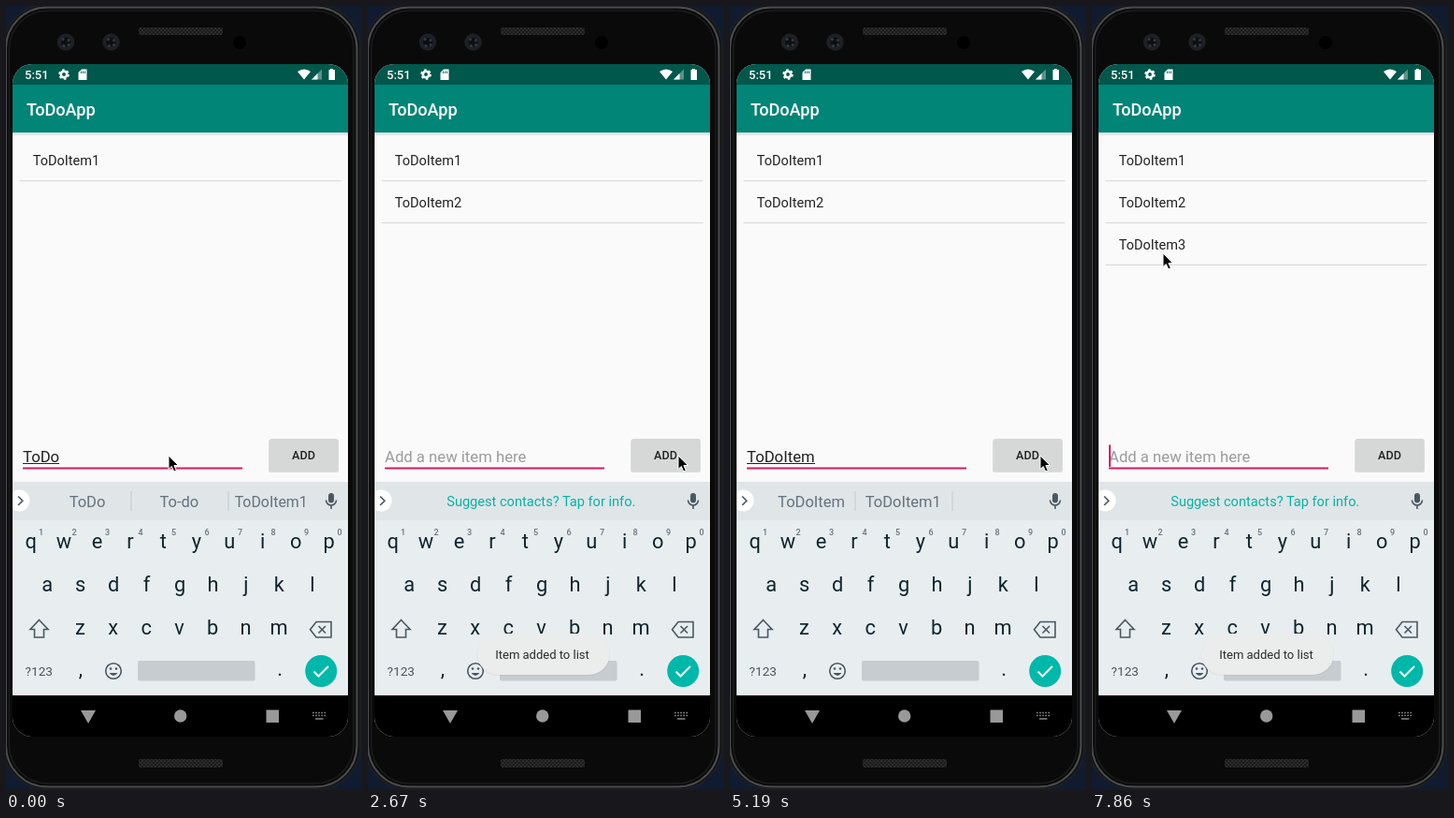
Animation, 381 px wide and 837 px high, one loop 8 s. Source, as an HTML page:

```html
<!DOCTYPE html>
<html lang="en">
<head>
<meta charset="utf-8">
<title>ToDoApp</title>
<style>
  html, body { margin: 0; width: 100%; height: 100%; overflow: hidden; background: #111b30; }
  svg { display: block; width: 381px; height: 837px; font-family: Roboto, sans-serif; }
  text { white-space: pre; }
  .mid { text-anchor: middle; }
  .medium { font-weight: 500; }
  .key { font-size: 21.8px; fill: #10252d; }
  .digit { font-size: 9px; font-weight: 500; fill: #68737a; }
  .item { font-size: 14.5px; fill: #212121; }
  .entry { font-size: 16.7px; }
  .suggestion { font-size: 16.5px; fill: #65737b; }
  .line { fill: none; stroke: #4a5860; stroke-width: 1.6; }
</style>
</head>
<body>
<svg viewBox="0 0 381 837">
  <defs>
    <pattern id="mesh" width="4" height="4" patternUnits="userSpaceOnUse">
      <rect width="4" height="4" fill="#1b1b1b"/>
      <path d="M0 4L4 0M0 0L4 4" stroke="#303030" stroke-width=".8"/>
    </pattern>
    <linearGradient id="shade" x2="0" y2="1">
      <stop stop-color="#000" stop-opacity=".16"/>
      <stop offset="1" stop-color="#000" stop-opacity="0"/>
    </linearGradient>
    <clipPath id="screen"><rect x="7" y="62" width="359" height="718" rx="21"/></clipPath>
  </defs>

  <!-- phone body -->
  <rect x="-3" y="-1" width="382" height="837" rx="46" fill="#111214" stroke="#1d1e20" stroke-width="2"/>
  <rect x="0" y="1.500" width="375.500" height="832" rx="44" fill="#0a0a0a" stroke="#4b4d50" stroke-width="2"/>
  <rect x="3.500" y="5" width="368.500" height="825" rx="41" fill="#0a0a0a" stroke="#1c1c1d" stroke-width="1.500"/>
  <rect x="142" y="23" width="90" height="8" rx="2" fill="url(#mesh)"/>
  <rect x="142" y="804" width="90" height="9" rx="2" fill="url(#mesh)"/>
  <g id="lenses"></g>
  <circle cx="250" cy="39" r="7" fill="#000"/>

  <g clip-path="url(#screen)">
    <rect x="7" y="62" width="359" height="718" fill="#fafafa"/>
    <rect x="7" y="135" width="359" height="4" fill="url(#shade)"/>
    <rect x="7" y="62" width="359" height="22" fill="#00574b"/>
    <rect x="7" y="84" width="359" height="51" fill="#008577"/>

    <!-- status bar -->
    <g fill="#fff">
      <text class="medium" x="20" y="78" font-size="13">5:51</text>
      <circle cx="62" cy="73" r="3.2" fill="none" stroke="#fff" stroke-width="2.6"/>
      <circle cx="62" cy="73" r="5" fill="none" stroke="#fff" stroke-width="1.6" stroke-dasharray="2.6 2.636"/>
      <path d="M81 67.500H86.500V79H77.500V71Z"/>
      <path d="M80.500 69.500V72M82.500 69.500V72M84.500 69.500V72" stroke="#00574b" stroke-width=".9"/>
      <path d="M312 70Q319 65 326 70L319 78.500Z"/>
      <path d="M338 67.500V78.500H327Z" opacity=".35"/>
      <path d="M333.500 72V78.500H327Z"/>
      <path d="M347 67H350V68H352V79H345.500V68H347Z"/>
    </g>
    <text class="medium" x="22" y="117" font-size="18.100" fill="#fff">ToDoApp</text>

    <g id="items"></g>

    <!-- entry row -->
    <text id="hint" class="entry" x="18" y="487" fill="#9b9b9b">Add a new item here</text>
    <text id="entry" class="entry" x="18" y="487" fill="#212121"></text>
    <rect id="composing" x="18" y="488" height="1" fill="#212121"/>
    <rect x="18" y="492.500" width="235" height="2" fill="#d81b60"/>
    <rect id="caret" y="468.500" width="2" height="23.500" fill="#d81b60"/>
    <rect x="281" y="463" width="75" height="35" rx="2" fill="#000" opacity=".12"/>
    <rect id="button" x="282" y="462" width="73.500" height="34.500" rx="2"/>
    <text class="mid medium" x="318.500" y="484.200" font-size="12.600" fill="#212121">ADD</text>

    <!-- keyboard -->
    <rect x="7" y="508" width="359" height="41" fill="#e0e5e8"/>
    <rect x="7" y="549" width="359" height="187" fill="#e8edf0"/>
    <circle cx="14" cy="528" r="11.500" fill="#fff"/>
    <path d="M13 523.500L17.800 528.200L13 533" class="line" stroke-width="2"/>
    <g id="strip"></g>
    <text id="notice" class="mid" x="185.300" y="534" font-size="14.600" fill="#00b5a5">Suggest contacts? Tap for info.</text>
    <rect x="345" y="520" width="6" height="10.500" rx="3" fill="#4a5860"/>
    <path d="M342.500 527.500A5.500 5.500 0 0 0 353.500 527.500M348 533V537" class="line"/>
    <g id="keys"></g>
    <path d="M35.500 655.500L45 665.500H40.500V674H30.500V665.500H26Z" class="line"/>
    <path d="M332 657.500H348V674H332L325.500 665.700ZM334.500 662L342 669.500M342 662L334.500 669.500" class="line"/>
    <text class="mid" x="35.300" y="714.700" font-size="13.600" fill="#47545b">?123</text>
    <text class="mid key" x="80" y="715">,</text>
    <text class="mid key" x="293" y="715">.</text>
    <circle cx="115" cy="710" r="8.300" class="line"/>
    <path d="M110.500 712Q115 718 119.500 712Z" fill="#4a5860"/>
    <circle cx="112" cy="707.500" r="1.300" fill="#4a5860"/>
    <circle cx="118" cy="707.500" r="1.300" fill="#4a5860"/>
    <rect x="141" y="699" width="125.500" height="21.500" rx="2" fill="#c7ccd0"/>
    <circle cx="337.200" cy="710" r="17" fill="#00b8a9"/>
    <path d="M329.500 710.500L334.500 715.500L345 705" fill="none" stroke="#fff" stroke-width="2"/>

    <g id="toast">
      <rect x="116.500" y="671" width="142.500" height="44" rx="22" fill="#000" opacity=".05"/>
      <rect x="117" y="670" width="141.500" height="44" rx="22" fill="#ebecec"/>
      <text class="mid" x="186.500" y="697" font-size="13" fill="#2b2b2b">Item added to list</text>
    </g>

    <!-- navigation bar -->
    <rect x="7" y="736" width="359" height="44" fill="#000"/>
    <g fill="#999">
      <path d="M80 752H96L88 766Z"/>
      <circle cx="186.700" cy="758" r="6.700"/>
      <rect x="278.500" y="751.500" width="13.500" height="13.500"/>
    </g>
    <path d="M328 754.500H342.500M328 757.500H342.500" stroke="#888" stroke-width="1.700" stroke-dasharray="1.700 1.400"/>
    <path d="M331 761H339.500" stroke="#888" stroke-width="1.500"/>
  </g>

  <path id="pointer" d="M0 0V14.500L3.300 11.500L5.700 17L8.300 15.800L5.900 10.500H10.500Z" fill="#000" stroke="#fff" stroke-width="1" stroke-linejoin="round"/>
</svg>

<script>
const $ = id => document.getElementById(id);

function add(parent, tag, attrs, content = "") {
  const node = document.createElementNS("http://www.w3.org/2000/svg", tag);
  for (const name in attrs) node.setAttribute(name, attrs[name]);
  node.textContent = content;
  return parent.appendChild(node);
}

for (const cx of [64, 112.5]) {
  add($("lenses"), "circle", { cx, cy: 38.5, r: 9.3, fill: "#1d2024" });
  add($("lenses"), "circle", { cx, cy: 38.5, r: 5, fill: "#0d0f12" });
  for (const [dx, dy] of [[-3, -3], [3, -2], [-2, 4], [3, 3]])
    add($("lenses"), "circle", { cx: cx + dx, cy: 38.5 + dy, r: 1.5, fill: "#343a42" });
}

function keyRow(letters, left, baseline) {
  [...letters].forEach((letter, i) =>
    add($("keys"), "text", { class: "mid key", x: left + i * 35.45, y: baseline }, letter));
}
keyRow("qwertyuiop", 26.6, 579);
keyRow("asdfghjkl", 44.2, 625);
keyRow("zxcvbnm", 79.3, 671);
[..."1234567890"].forEach((digit, i) =>
  add($("keys"), "text", { class: "mid digit", x: 37.5 + i * 35.5, y: 565 }, digit));

const rows = [1, 2, 3].map(n => {
  const row = add($("items"), "g", {});
  const top = 135 + (n - 1) * 44.9;
  add(row, "text", { class: "item", x: 28.8, y: top + 35 }, "ToDoItem" + n);
  add(row, "rect", { x: 14.5, y: top + 51, width: 344, height: 1.2, fill: "#d9dada" });
  return row;
});

for (const x of [133.5, 237.5])
  add($("strip"), "rect", { x, y: 518, width: 1, height: 21, fill: "#c3c9cd" });
const slots = [87, 185.3, 283.7].map((x, i) =>
  add($("strip"), "text", { class: "mid suggestion", x, y: 535, style: i === 2 ? "font-size:15.9px" : "" }));

// Each step lists only what changes: [time in ms, changes].
const steps = [
  [0, { text: "ToDo", caret: 0, items: 1, toast: 0, pressed: 0, at: [174, 480], notice: 0 }],
  [150, { text: "ToDoI", caret: 1 }],
  [300, { text: "ToDoIt" }],
  [440, { text: "ToDoIte" }],
  [590, { text: "ToDoItem" }],
  [1040, { caret: 0 }],
  [1330, { text: "ToDoItem2", caret: 1 }],
  [1780, { at: [291, 482] }],
  [1930, { at: [325, 480], caret: 0 }],
  [2080, { at: [332, 480], pressed: 1 }],
  [2220, { text: "", items: 2, pressed: 0, notice: 1, caret: 1, toast: 0.2 }],
  [2370, { toast: 0.75 }],
  [2520, { toast: 1 }],
  [2670, { caret: 0 }],
  [2810, { text: "T", caret: 1, notice: 0 }],
  [3110, { text: "To" }],
  [3560, { text: "ToDo" }],
  [4150, { text: "ToDoI", toast: 0.96 }],
  [4300, { text: "ToDoIt", toast: 0.8 }],
  [4450, { text: "ToDoIte", toast: 0.5 }],
  [4600, { text: "ToDoItem", toast: 0 }],
  [5050, { caret: 0 }],
  [5200, { text: "ToDoItem3", caret: 1 }],
  [5340, { at: [335, 481] }],
  [5490, { at: [338, 481] }],
  [5640, { caret: 0 }],
  [6240, { caret: 1 }],
  [6530, { pressed: 1 }],
  [6680, { text: "", items: 3, pressed: 0, notice: 1, toast: 0.2 }],
  [6830, { toast: 0.75 }],
  [6980, { toast: 1 }],
  [7120, { caret: 0 }],
  [7270, { at: [290, 440] }],
  [7420, { at: [150, 335] }],
  [7570, { at: [71, 277], caret: 1 }],
  [7720, { at: [73, 269] }],
  [7860, { at: [76, 264] }]
];

function suggestionsFor(text) {
  if (text === "ToDo") return ["ToDo", "To-do", "ToDoItem1"];
  return /^ToDoI[a-z]*$/.test(text) ? [text, "ToDoItem1", ""] : [];
}

const show = (node, visible) => { node.style.display = visible ? "" : "none"; };

function render(time) {
  const state = Object.assign({}, ...steps.filter(([start]) => start <= time).map(step => step[1]));
  const suggestions = suggestionsFor(state.text);
  $("entry").textContent = state.text;
  show($("hint"), !state.text);
  const width = state.text ? Math.round($("entry").getComputedTextLength()) : 0;
  $("composing").setAttribute("width", width);
  $("caret").setAttribute("x", 18 + width);
  show($("caret"), state.caret);
  show($("strip"), suggestions.length);
  slots.forEach((slot, i) => { slot.textContent = suggestions[i] || ""; });
  show($("notice"), state.notice);
  rows.forEach((row, i) => show(row, i < state.items));
  $("toast").style.opacity = state.toast;
  $("button").setAttribute("fill", state.pressed ? "#c4c6c6" : "#d6d8d8");
  $("pointer").setAttribute("transform", `translate(${state.at})`);
}

const start = performance.now();
function tick() {
  render((performance.now() - start) % 8000);
  requestAnimationFrame(tick);
}
tick();
</script>
</body>
</html>
```
